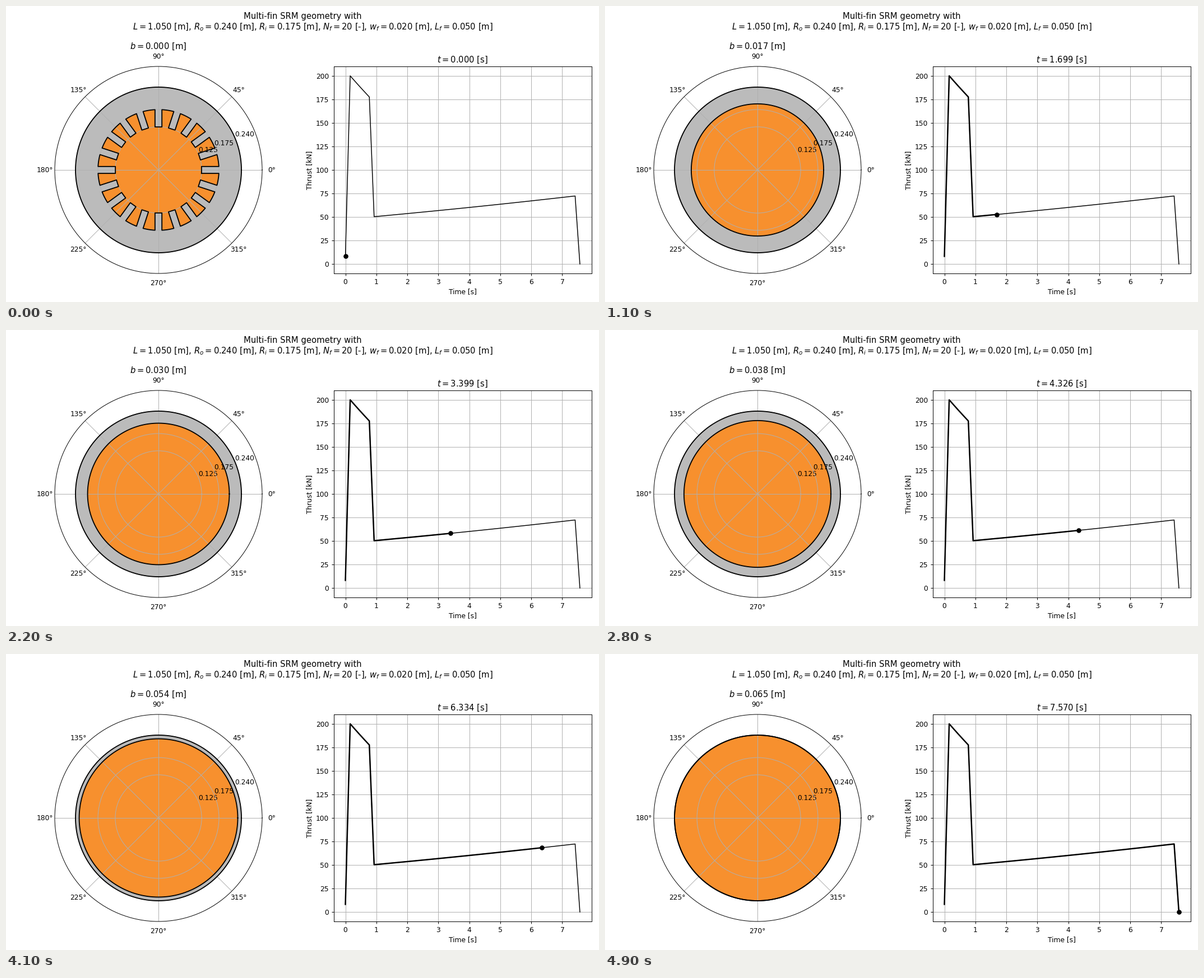
Recreate the animation shown at these times as a matplotlib script. Size 1058 by 529 pixels, loop 5 s.

```python
import numpy as np
import matplotlib.pyplot as plt
from matplotlib.animation import FuncAnimation

W, H, DPI = 1058, 529, 88.17
FRAMES, INTERVAL = 50, 100
T_END = 7.57

# Grain geometry [m]
L, R_O, R_I, N_F, W_F, L_F = 1.05, 0.24, 0.175, 20, 0.02, 0.05

# Burn model: rate = C * perimeter**0.44, thrust ~ perimeter**1.44
C, POWER = 0.00723, 0.44
F_START, F_PEAK = 8.2, 199.9

GREY, ORANGE = "#bbbbbb", "#f7902e"


def perimeter(b):
    fins = 2 * N_F * (L_F - b) if b < W_F / 2 else 0
    return 2 * np.pi * (R_I + b) + fins


def burn_depths(substeps=200):
    dt = T_END / (FRAMES - 1) / substeps
    b, depths = 0.0, [0.0]
    for _ in range(FRAMES - 1):
        for _ in range(substeps):
            b += C * perimeter(b) ** POWER * dt
        depths.append(min(b, R_O - R_I))
    return np.array(depths)


def thrust_curve(depths):
    p = np.array([perimeter(b) for b in depths])
    thrust = F_PEAK * (p / p[1]) ** (1 + POWER)
    thrust[0], thrust[-1] = F_START, 0
    return thrust


def circle(r):
    theta = np.linspace(0, 2 * np.pi, 361)
    return theta, np.full_like(theta, r)


def port_outline(b):
    """Polar contour of the open port after burning to depth b."""
    base = R_I + b
    half = W_F / 2 - b
    if half <= 0:
        return circle(base)
    tip = R_I - L_F + b
    a_base, a_tip = np.arcsin(half / base), np.arcsin(half / tip)
    pitch = 2 * np.pi / N_F
    arc = np.linspace(a_base, pitch - a_base, 20)
    theta = np.concatenate([k * pitch + np.r_[-a_tip, a_tip, arc]
                            for k in range(N_F)])
    r = np.tile(np.r_[tip, tip, np.full(arc.size, base)], N_F)
    return np.r_[theta, theta[0] + 2 * np.pi], np.r_[r, r[0]]


def place(left, top, right, bottom):
    return [left / W, 1 - bottom / H, (right - left) / W, (bottom - top) / H]


time = np.linspace(0, T_END, FRAMES)
depth = burn_depths()
thrust = thrust_curve(depth)

fig = plt.figure(figsize=(12, 6), dpi=DPI)
fig.suptitle(
    "Multi-fin SRM geometry with\n"
    f"        $L = {L:.3f}$ [m], $R_o = {R_O:.3f}$ [m], $R_i = {R_I:.3f}$ [m], "
    f"$N_f = {N_F}$ [-], $w_f = {W_F:.3f}$ [m], $L_f = {L_F:.3f}$ [m]")

grain = fig.add_axes(place(87, 108, 457, 478), projection="polar")
grain.fill(*circle(R_O), color=GREY, lw=0)
port, = grain.fill(*port_outline(0), color=ORANGE, lw=0)
grain.plot(*circle(R_O), "k", lw=1.5)
edge, = grain.plot([], [], "k", lw=1.5)
grain.set_ylim(0, 0.3)
grain.set_yticks([R_I - L_F, R_I, R_O])

chart = fig.add_axes(place(584.6, 108, 1044.8, 478))
chart.plot(time, thrust, "k", lw=1.2)
trace, = chart.plot([], [], "k", lw=2)
dot, = chart.plot([], [], "ko")
chart.set_xlim(-0.05 * T_END, 1.05 * T_END)
chart.set_ylim(-0.05 * F_PEAK, 1.05 * F_PEAK)
chart.set_xlabel("Time [s]")
chart.set_ylabel("Thrust [kN]")
chart.grid()


def update(i):
    theta, r = port_outline(depth[i])
    port.set_xy(np.column_stack([theta, r]))
    edge.set_data(theta, r)
    trace.set_data(time[:i + 1], thrust[:i + 1])
    dot.set_data([time[i]], [thrust[i]])
    grain.set_title(f"$b = {depth[i]:.3f}$ [m]")
    chart.set_title(f"$t = {time[i]:.3f}$ [s]")


anim = FuncAnimation(fig, update, frames=FRAMES, interval=INTERVAL, repeat=True)
plt.show()
```
